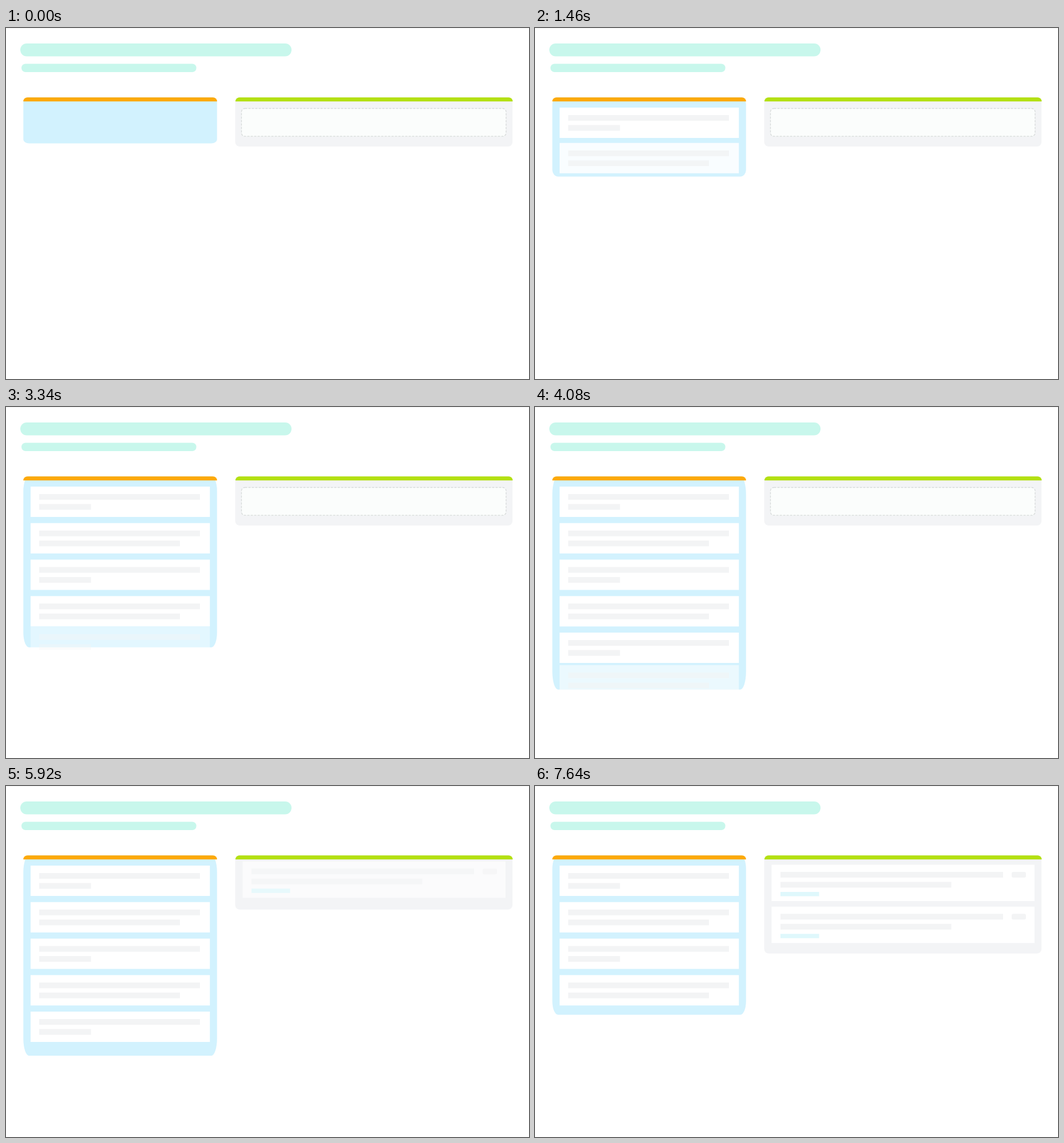
An HTML page with a canvas for the animation above (8 s loop, 914 by 613 pixels).

```html
<!DOCTYPE html>
<html>
<head>
<meta charset="utf-8">
<style>
  html, body { margin: 0; width: 100%; height: 100%; overflow: hidden; background: #fff; }
  canvas { display: block; }
</style>
</head>
<body>
<canvas id="stage" width="914" height="613"></canvas>
<script>
const ctx = document.getElementById('stage').getContext('2d');
const LOOP = 8000;
const GREY = '#f3f4f5';

// Entrance of each card on the left: start, duration, panel bottom afterwards
const entries = [
  [440, 340, 205.5], [1120, 500, 267], [1800, 340, 335],
  [2520, 500, 398], [3260, 340, 457.5], [3900, 480, 522]
];
// Cards handed over to the right panel
const moves = [
  { card: 5, leave: 5240, leaveTime: 400, shrink: 5690, shrinkTime: 550, bottom: 458.5,
    arrive: 5760, arriveTime: 480, rightBottom: 219.5 },
  { card: 4, leave: 7160, leaveTime: 260, shrink: 7200, shrinkTime: 440, bottom: 399.5,
    arrive: 7220, arriveTime: 420, rightBottom: 292.5 }
];

const progress = (t, start, time) => Math.min(1, Math.max(0, (t - start) / time));
const sineOut = p => Math.sin(p * Math.PI / 2);
const cubicOut = p => 1 - (1 - p) ** 3;
const mix = (a, b, p) => a + (b - a) * p;

function box(x, y, w, h, color, radii = 0) {
  ctx.fillStyle = color;
  ctx.beginPath();
  ctx.roundRect(x, y, w, h, radii);
  ctx.fill();
}

function leftCard(i, dx, dy, alpha) {
  if (alpha <= 0) return;
  ctx.save();
  ctx.globalAlpha = alpha;
  ctx.translate(43 + dx, 139 + 63.75 * i + dy);
  box(0, 0, 313.3, 53, '#fff');
  box(15, 13, 281, 10, GREY);
  box(15, 30.5, i % 2 ? 246 : 90.5, 10, GREY);
  ctx.restore();
}

function rightCard(i, dy, alpha) {
  if (alpha <= 0) return;
  ctx.save();
  ctx.globalAlpha = alpha;
  ctx.translate(413.5, 137.5 + 73.3 * i + dy);
  box(0, 0, 459.5, 63.5, '#fff');
  box(15.5, 12.5, 389, 10, GREY);
  box(419.5, 12.5, 25, 10, GREY, 3);
  box(15.5, 30, 298.5, 10, GREY);
  box(15.5, 47.5, 67.5, 7.5, '#dff8fc');
  ctx.restore();
}

function dropZone(alpha) {
  if (alpha <= 0) return;
  ctx.save();
  ctx.globalAlpha = alpha;
  box(411.5, 140.5, 462.5, 48.7, '#fbfdfc', 6);
  ctx.strokeStyle = '#d7dbda';
  ctx.lineWidth = 1.3;
  ctx.setLineDash([4, 2]);
  ctx.stroke();
  ctx.restore();
}

function draw(t) {
  ctx.fillStyle = '#fff';
  ctx.fillRect(0, 0, 914, 613);
  box(0, 0, 914, 1, '#f4f4f5');
  box(25, 27, 474, 22.5, '#c8f7ec', 11.2);
  box(27, 62.5, 305.7, 14.5, '#c8f7ec', 7.2);

  let bottom = 201.5, rightBottom = 207;
  const shown = entries.map(([start, time, end]) => {
    const p = sineOut(progress(t, start, time));
    bottom = mix(bottom, end, p);
    return p;
  });
  for (const m of moves) {
    bottom = mix(bottom, m.bottom, cubicOut(progress(t, m.shrink, m.shrinkTime)));
    rightBottom = mix(rightBottom, m.rightBottom, cubicOut(progress(t, m.arrive, m.arriveTime)));
  }

  // The body is stretched vertically, so its corners grow with the height
  const height = bottom - 121;
  box(30.3, 121, 338.5, height, '#d2f2fe', { x: 10, y: height * 0.085 });
  box(30.3, 121.2, 338.5, 7, '#fca90a', [8, 8, 0, 0]);
  shown.forEach((p, i) => {
    const m = moves.find(move => move.card === i);
    const out = m ? sineOut(progress(t, m.leave, m.leaveTime)) : 0;
    leftCard(i, 44 * out, -16 * (1 - p), p * (1 - out));
  });

  box(400.5, 121, 484.7, rightBottom - 121, '#f3f4f6', 8);
  dropZone(1 - progress(t, 5500, 240));
  moves.forEach((m, i) => {
    const p = cubicOut(progress(t, m.arrive, m.arriveTime));
    rightCard(i, -20 * (1 - p), p);
  });
  box(401, 121.2, 484.5, 7, '#b3e011', [8, 8, 0, 0]);
}

function frame() {
  draw(performance.now() % LOOP);
  requestAnimationFrame(frame);
}
frame();
</script>
</body>
</html>
```
